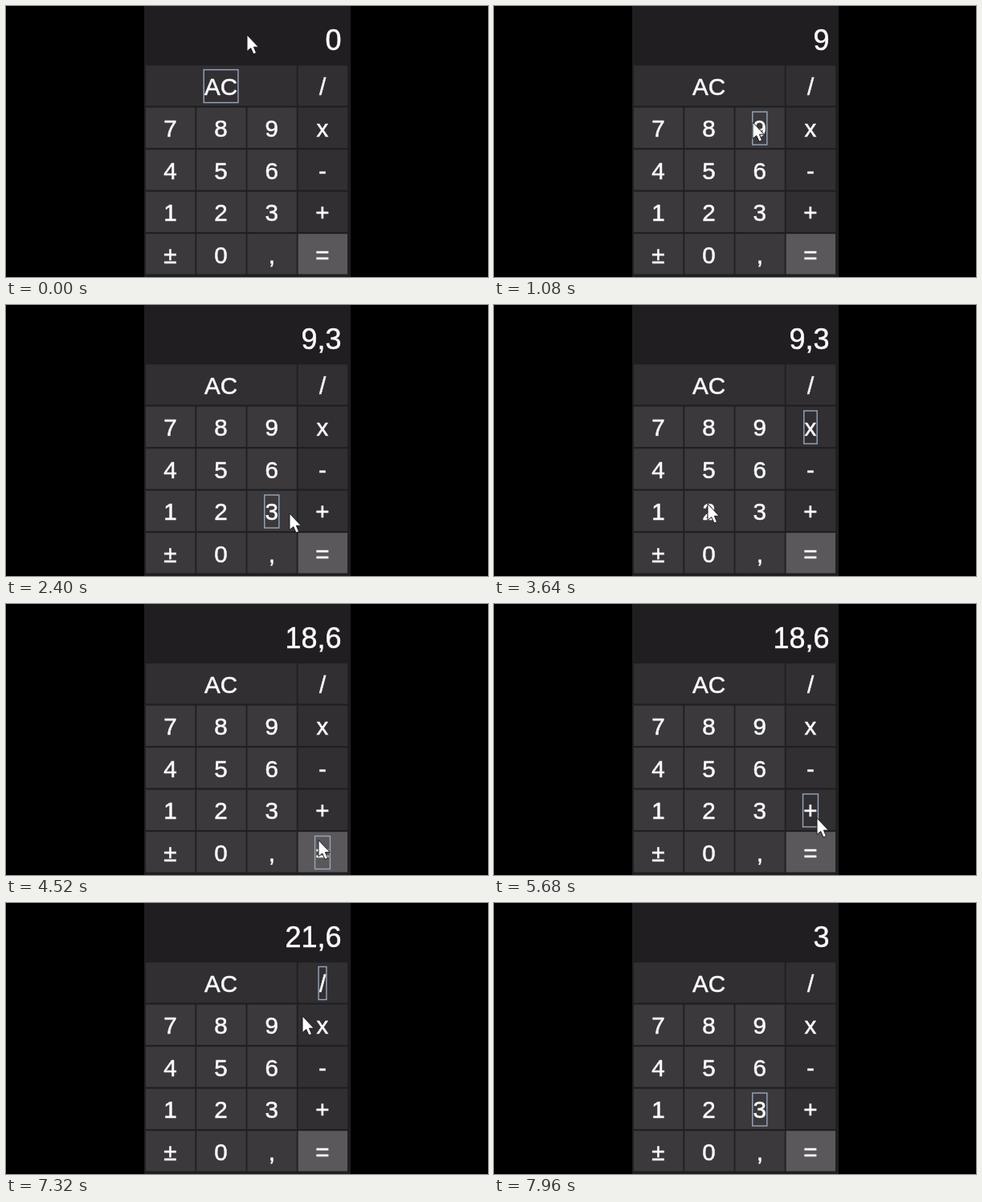
Recreate the animation shown at these times as an HTML page. Size 600 px wide and 338 px high, loop 8000 ms.

```html
<!DOCTYPE html>
<html lang="en">
<head>
<meta charset="utf-8">
<title>Calculator</title>
<style>
  html, body { margin: 0; width: 100%; height: 100%; overflow: hidden; background: #000; }
  svg { display: block; width: 600px; height: 338px; }
  text {
    font: 29.6px "Liberation Sans", Arial, sans-serif; text-anchor: middle;
    fill: #fafafa; stroke: #fafafa; stroke-width: .55px;
  }
  #display { font-size: 36px; text-anchor: end; }
  #focus { fill: none; stroke: #98a6bd; stroke-width: 1.4; }
  #cursor { fill: #fff; stroke: #19181a; stroke-linejoin: round; }
</style>
</head>
<body>
<svg viewBox="0 0 600 338">
  <rect x="172" width="257" height="338" fill="#201e21"/>
  <text id="display" x="417.5" y="54.7"></text>
  <g id="keys"></g>
  <rect id="focus" height="41"/>
  <path id="cursor" d="M0 0V20.5L4.8 16.6L8 24L11.6 22.4L8.4 15.2H14.4Z"/>
</svg>
<script>
const LOOP = 8000, STEP = 40, HOLD = 80, PITCH = { x: 63.2, y: 52.5 };
const $ = id => document.getElementById(id);

const shades = {
  number: ["#3b393c", "#514f52"],
  operator: ["#312f32", "#474548"],
  equals: ["#5a585a", "#706e70"]
};
const keys = {};

function add(tag, attrs, content = "") {
  const node = document.createElementNS("http://www.w3.org/2000/svg", tag);
  for (const name in attrs) node.setAttribute(name, attrs[name]);
  node.textContent = content;
  return $("keys").appendChild(node);
}

function addKey(label, row, col, span = 1) {
  const x = 174 + col * PITCH.x, width = span * PITCH.x - 1.8;
  const centerX = x + width / 2 - 0.3, centerY = 100.2 + row * PITCH.y;
  const kind = label === "=" ? "equals" : col === 3 || span > 1 ? "operator" : "number";
  const cell = add("rect", { x, y: centerY - 26, width, height: PITCH.y - 2.2 });
  const text = add("text", { x: centerX, y: centerY + 10.6 }, label);
  keys[label] = { cell, text, centerX, centerY, shade: shades[kind] };
}

addKey("AC", 0, 0, 3);
addKey("/", 0, 3);
["789x", "456-", "123+", "±0,="].forEach((labels, r) =>
  [...labels].forEach((label, col) => addKey(label, r + 1, col)));

const operations = {
  "+": (a, b) => a + b,
  "-": (a, b) => a - b,
  "x": (a, b) => a * b,
  "/": (a, b) => a / b
};
const parse = text => Number(text.replace(",", "."));
const format = value => String(+value.toFixed(8)).replace(".", ",");

// Returns a function that takes a key and gives the display text after it.
function calculator() {
  let shown = "0", stored = 0, pending = null, fresh = true;
  return label => {
    if (label === "AC") {
      shown = "0"; pending = null; fresh = true;
    } else if (label === "=" || label in operations) {
      if (pending && !fresh) shown = format(operations[pending](stored, parse(shown)));
      stored = parse(shown);
      pending = label === "=" ? null : label;
      fresh = true;
    } else {
      shown = fresh && label !== "," ? label : shown + label;
      fresh = false;
    }
    return shown;
  };
}

const type = calculator();
const presses = [
  ["AC", -HOLD], ["9", 960], [",", 1740], ["3", 2220], ["x", 2880], ["2", 3700],
  ["=", 4180], ["+", 5520], ["3", 5960], ["=", 6400], ["/", 7040], ["3", 7680]
].map(([label, down]) => ({ label, down, up: down + HOLD, shown: type(label) }));

// The pointer visits each pressed key, with a few drifts in between.
const drifts = [
  [0, 300, 36], [1080, 322, 145], [2400, 353, 260], [3640, 266, 248],
  [5680, 402, 267], [6680, 405, 228], [7920, 322, 345], [LOOP, 322, 345]
];
const visits = presses.slice(1).map(({ label, down }) =>
  [down + HOLD / 2, keys[label].centerX - 5, keys[label].centerY - 9]);
const path = [...drifts, ...visits].sort((a, b) => a[0] - b[0]);

function pointer(t) {
  const next = path.findIndex(stop => stop[0] > t);
  const [t0, x0, y0] = path[next - 1], [t1, x1, y1] = path[next];
  const u = (t - t0) / (t1 - t0), eased = u * u * (3 - 2 * u);
  return [x0 + (x1 - x0) * eased, y0 + (y1 - y0) * eased];
}

function showFocus({ text, centerX, centerY }) {
  const width = text.getComputedTextLength() + 1.6;
  $("focus").setAttribute("x", centerX - width / 2);
  $("focus").setAttribute("y", centerY - 20.7);
  $("focus").setAttribute("width", width);
}

function render(t) {
  const current = presses.findLast(press => press.down <= t);
  for (const label in keys) {
    const active = label === current.label && t < current.up;
    keys[label].cell.setAttribute("fill", keys[label].shade[+active]);
  }
  $("display").textContent = presses.findLast(press => press.up <= t).shown;
  showFocus(keys[current.label]);
  $("cursor").setAttribute("transform", `translate(${pointer(t)})`);
}

const start = performance.now();
function frame() {
  const elapsed = (performance.now() - start) % LOOP;
  render(Math.floor(elapsed / STEP) * STEP);
  requestAnimationFrame(frame);
}
frame();
</script>
</body>
</html>
```
